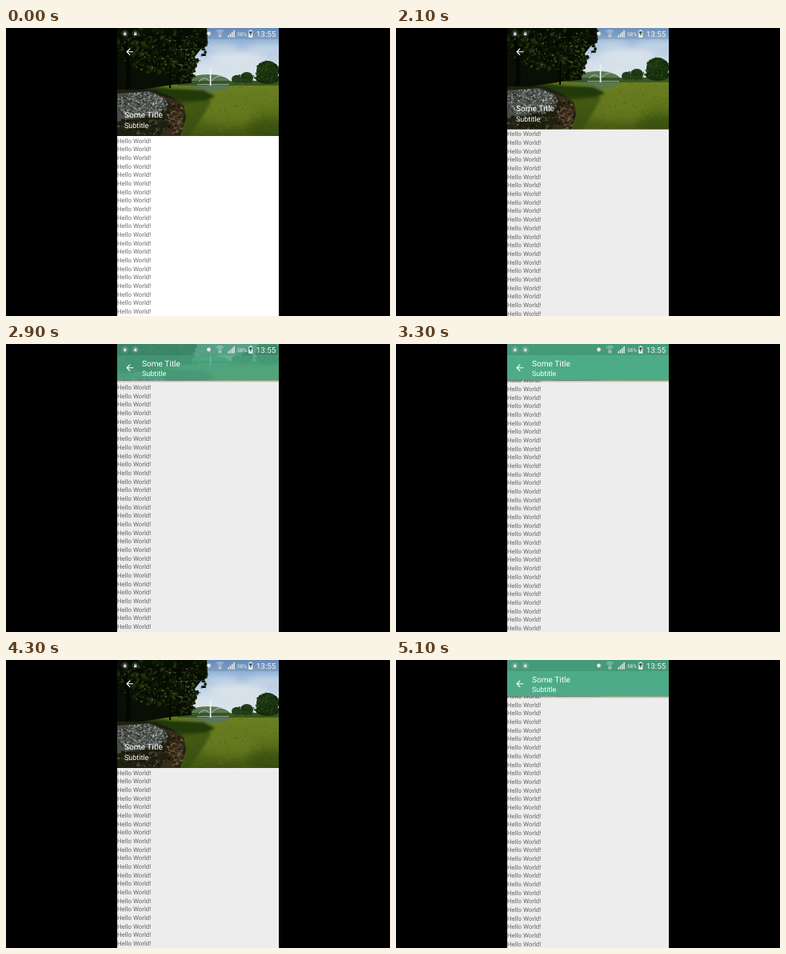
An HTML page with a canvas that plays this animation: 480x360 px, repeating every 5.2 s.

```html
<!DOCTYPE html>
<html lang="en">
<head>
<meta charset="utf-8">
<title>Collapsing toolbar</title>
<style>
html, body { margin: 0; width: 100%; height: 100%; overflow: hidden; background: #000; }
canvas { display: block; }
</style>
</head>
<body>
<canvas id="stage" width="480" height="360"></canvas>
<script>
const ctx = document.getElementById('stage').getContext('2d');
ctx.textRendering = 'geometricPrecision';
const LOOP = 5200, LEFT = 139, WIDTH = 202;
const EXPANDED = 135, COLLAPSED = 45.4, STATUS = 14, ROW = 10.68;
const RANGE = EXPANDED - COLLAPSED;

// [time, scroll offset] of the dragged list
const drag = [
  [0, 0], [1200, 0], [1300, .4], [1900, .4], [2200, 12], [2400, 34], [2600, 65],
  [2900, 107.8], [3100, 116], [3300, 106], [3700, 60], [4100, 8], [4300, 0],
  [4400, 14], [4600, 66], [4900, 102], [5100, 106.1], [5200, 107]
];
// [start time, whether the green scrim fades in]
const fades = [[2550, true], [3700, false], [4500, true]];

function scrollAt(t) {
  const i = drag.findIndex(([end]) => end > t);
  const [t0, s0] = drag[i - 1], [t1, s1] = drag[i];
  return s0 + (s1 - s0) * (t - t0) / (t1 - t0);
}

function scrimAt(t) {
  const fade = fades.filter(([start]) => start <= t).pop();
  if (!fade) return 0;
  const p = Math.min(1, (t - fade[0]) / 600);
  const eased = 1 - (1 - p) ** 2.2;
  return fade[1] ? eased : 1 - eased;
}

function makePhoto() {
  const canvas = document.createElement('canvas');
  canvas.width = WIDTH;
  canvas.height = 136;
  const g = canvas.getContext('2d');
  let seed = 11;
  const rand = (a = 0, b = 1) => {
    seed = (seed * 16807) % 2147483647;
    return a + (b - a) * seed / 2147483647;
  };
  const gradient = (y0, y1, ...colors) => {
    const fill = g.createLinearGradient(0, y0, 0, y1);
    colors.forEach((c, i) => fill.addColorStop(i / (colors.length - 1), c));
    return fill;
  };
  const ellipse = (x, y, rx, ry, color) => {
    g.fillStyle = color;
    g.beginPath();
    g.ellipse(x, y, rx, ry, 0, 0, 7);
    g.fill();
  };
  const poly = (color, ...p) => {
    g.fillStyle = color;
    g.beginPath();
    for (let i = 0; i < p.length; i += 2) g.lineTo(p[i], p[i + 1]);
    g.fill();
  };
  const speckle = (n, x, y, rx, ry, size, colors) => {
    for (let i = 0; i < n; i++) {
      const a = rand(0, 6.283), r = Math.sqrt(rand());
      ellipse(x + rx * r * Math.cos(a), y + ry * r * Math.sin(a),
        rand(.4, size), rand(.4, size * .8), colors[Math.floor(rand(0, colors.length))]);
    }
  };

  // Sky and clouds
  g.fillStyle = gradient(0, 70, '#6f9bd0', '#a3bfdc', '#d3dfe9', '#dfe6ea');
  g.fillRect(0, 0, WIDTH, 72);
  g.filter = 'blur(4px)';
  ellipse(150, 38, 36, 9, '#e0e7edcc');
  ellipse(188, 26, 26, 6, '#d3dfeaa0');
  ellipse(130, 25, 20, 5, '#d0deea99');
  g.filter = 'none';

  // Lawn
  g.fillStyle = gradient(70, 136, '#6b7f22', '#647a1e', '#546a17', '#3f5411');
  g.fillRect(0, 70, WIDTH, 66);
  g.filter = 'blur(5px)';
  ellipse(140, 108, 36, 14, '#74842666');
  ellipse(196, 126, 34, 14, '#2c430d70');
  g.filter = 'none';
  speckle(700, 145, 104, 85, 32, 1.1, ['#85902a30', '#2f430f50', '#8c974030']);

  // Horizon and fountain
  ellipse(114, 69, 28, 11, '#5a7850');
  g.fillStyle = '#385527';
  g.fillRect(75, 66, 127, 6);
  g.fillStyle = '#8e9f9d';
  g.fillRect(100, 70, 44, 1.2);
  g.strokeStyle = '#ecf1f5';
  g.lineWidth = 1.7;
  g.beginPath();
  g.moveTo(116.6, 50);
  g.lineTo(116.6, 72);
  g.stroke();
  g.strokeStyle = '#dfe8eab0';
  g.lineWidth = .9;
  g.beginPath();
  g.moveTo(118, 66);
  g.quadraticCurveTo(129, 53, 143, 67);
  g.moveTo(115, 66);
  g.quadraticCurveTo(109, 59, 102, 67);
  g.stroke();

  // Right-hand trees
  const leaves = ['#12280b', '#213b13', '#2b4819', '#17300d'];
  ellipse(188, 54, 14, 13, '#1d3712');
  ellipse(188, 63, 15, 7, '#152c0d');
  ellipse(162, 62, 8, 7, '#203b16');
  ellipse(149, 64, 6, 5, '#244019');
  speckle(110, 188, 55, 15, 14, 2, leaves);
  speckle(45, 160, 63, 14, 6, 1.4, leaves);
  poly('#3c5719', 140, 70, 202, 70, 202, 72, 140, 72);

  // Shade below the large tree
  g.filter = 'blur(1.5px)';
  poly('#223a0a', 0, 73, 60, 74, 108, 78, 122, 85, 112, 91, 80, 94, 0, 94);
  poly('#32490fa0', 76, 90, 118, 90, 108, 108, 90, 136, 78, 136);
  poly('#5b7222', 50, 73, 96, 73, 112, 76, 70, 76);
  g.filter = 'none';

  // Large tree
  const foliage = ['#060b02', '#0c1505', '#121f08', '#1e310e', '#080f03'];
  poly('#090f04', 0, 0, 112, 0, 113, 18, 104, 27, 97, 36, 100, 47, 93, 58, 93, 69,
    68, 71, 50, 74, 0, 82);
  speckle(420, 54, 25, 57, 33, 3.6, foliage);
  speckle(80, 79, 54, 19, 14, 3, foliage);
  speckle(60, 104, 12, 10, 15, 2.6, foliage);
  speckle(130, 55, 30, 52, 26, 1.5, ['#2c4513', '#3a531c', '#4c6630']);
  speckle(40, 90, 36, 14, 28, 1.2, ['#425c22', '#5b7442']);
  g.strokeStyle = '#050503';
  g.lineWidth = 5;
  g.beginPath();
  g.moveTo(12, 84);
  g.quadraticCurveTo(17, 52, 10, 22);
  g.stroke();
  g.lineWidth = 2;
  g.beginPath();
  g.moveTo(66, 75);
  g.lineTo(67, 46);
  g.stroke();

  // Flower bed with a stone edge
  poly('#1f2010', 0, 77, 48, 77, 68, 86, 83, 97, 86, 112, 78, 136, 0, 136);
  poly('#382c1b', 59, 86, 78, 92, 85, 103, 83, 116, 76, 136, 53, 136, 66, 115, 70, 101);
  speckle(90, 73, 113, 10, 21, 2.3, ['#5a472e', '#1d170d', '#69573c', '#2c2112']);
  poly('#494d48', 0, 82, 40, 79, 59, 87, 64, 96, 52, 107, 25, 113, 0, 117);
  speckle(650, 29, 97, 34, 17, 1.2,
    ['#90969a', '#b4babf', '#646a68', '#2b3022', '#7a8182', '#1d2114']);
  speckle(160, 34, 122, 34, 12, 2, ['#1f1e10', '#12140a', '#322b1b', '#4c4d40']);
  return canvas;
}

const photo = makePhoto();
const arrow = new Path2D('M20 11H7.83l5.59-5.59L12 4l-8 8 8 8 1.41-1.41L7.83 13H20v-2z');

function label(text, x, y, size, color = '#fff') {
  ctx.font = `${size}px Roboto, sans-serif`;
  ctx.fillStyle = color;
  ctx.fillText(text, x, y);
}

function dot(x, y, r) {
  ctx.beginPath();
  ctx.arc(x, y, r, 0, 7);
  ctx.fill();
}

function drawStatusBar() {
  ctx.fillStyle = 'rgba(0,0,0,.1)';
  ctx.fillRect(LEFT, 0, WIDTH, STATUS);
  ctx.strokeStyle = '#f2f5f2';
  for (const x of [148.7, 161.7]) {
    ctx.fillStyle = 'rgba(255,255,255,.12)';
    dot(x, 7, 4.6);
    ctx.fillStyle = '#e6eae6';
    ctx.fillRect(x - 1.6, 6.4, 3.2, 2.7);
    ctx.lineWidth = .7;
    ctx.beginPath();
    ctx.arc(x, 6.4, 1.2, Math.PI, 0);
    ctx.stroke();
  }
  dot(253.5, 7, 2.4);

  // Wireless
  ctx.lineWidth = .9;
  ctx.globalAlpha = .65;
  for (const r of [2.5, 4.5, 6.5]) {
    ctx.beginPath();
    ctx.arc(267.3, 9, r, -2.35, -.8);
    ctx.stroke();
  }
  ctx.globalAlpha = 1;
  ctx.fillRect(265.8, 8, 1, 3.5);
  ctx.fillRect(268, 8, 1, 3.5);

  // Signal
  for (let i = 0; i < 4; i++) {
    const height = 2.5 + i * 2.1;
    ctx.fillRect(277.5 + i * 2.3, 11.6 - height, 1.5, height);
  }
  label('58%', 289, 9.5, 6.4, '#edf2ee');

  // Battery
  ctx.fillStyle = '#f2f5f2';
  ctx.fillRect(304.6, 2.4, 2.4, 1.2);
  ctx.fillRect(303.3, 3.4, 5, 8.4);
  ctx.fillStyle = '#35443c';
  ctx.fillRect(304.2, 4.3, 3.2, 2.5);
  ctx.fillRect(305.3, 6.8, 1.2, 2.6);
  label('13:55', 312.7, 11, 9.9, '#f4f7f4');
}

function drawHeader(scroll, scrim) {
  const height = Math.max(COLLAPSED, EXPANDED - scroll);
  const progress = Math.min(1, scroll / RANGE);
  if (progress === 1) {
    const shadow = ctx.createLinearGradient(0, height, 0, height + 3);
    shadow.addColorStop(0, 'rgba(0,0,0,.3)');
    shadow.addColorStop(1, 'rgba(0,0,0,0)');
    ctx.fillStyle = shadow;
    ctx.fillRect(LEFT, height, WIDTH, 3);
  }
  ctx.save();
  ctx.beginPath();
  ctx.rect(LEFT, 0, WIDTH, height);
  ctx.clip();
  ctx.drawImage(photo, LEFT, -progress * RANGE / 2);
  ctx.globalAlpha = scrim;
  ctx.fillStyle = '#4dab88';
  ctx.fillRect(LEFT, 0, WIDTH, height);
  ctx.restore();

  drawStatusBar();
  ctx.save();
  ctx.translate(148, 23);
  ctx.scale(.561, .561);
  ctx.fillStyle = '#fff';
  ctx.fill(arrow);
  ctx.restore();
  const x = 148 + 22 * progress;
  label('Some Title', x, 112 - 84.2 * progress, 10.1);
  label('Subtitle', x, 124.7 - 84.5 * progress, 8.98);
}

function draw(t) {
  const scroll = scrollAt(t);
  ctx.fillStyle = '#000';
  ctx.fillRect(0, 0, 480, 360);
  ctx.save();
  ctx.beginPath();
  ctx.rect(LEFT, 0, WIDTH, 360);
  ctx.clip();
  ctx.fillStyle = t < 2000 ? '#fff' : '#ededed';
  ctx.fillRect(LEFT, 0, WIDTH, 360);
  for (let y = 143.5 - scroll; y < 372; y += ROW) {
    label('Hello World!', LEFT, y, 7.855, 'rgba(0,0,0,.58)');
  }
  drawHeader(scroll, scrimAt(t));
  ctx.restore();
}

function frame() {
  draw(Math.floor(performance.now() % LOOP / 100) * 100);
  requestAnimationFrame(frame);
}
frame();
</script>
</body>
</html>
```
